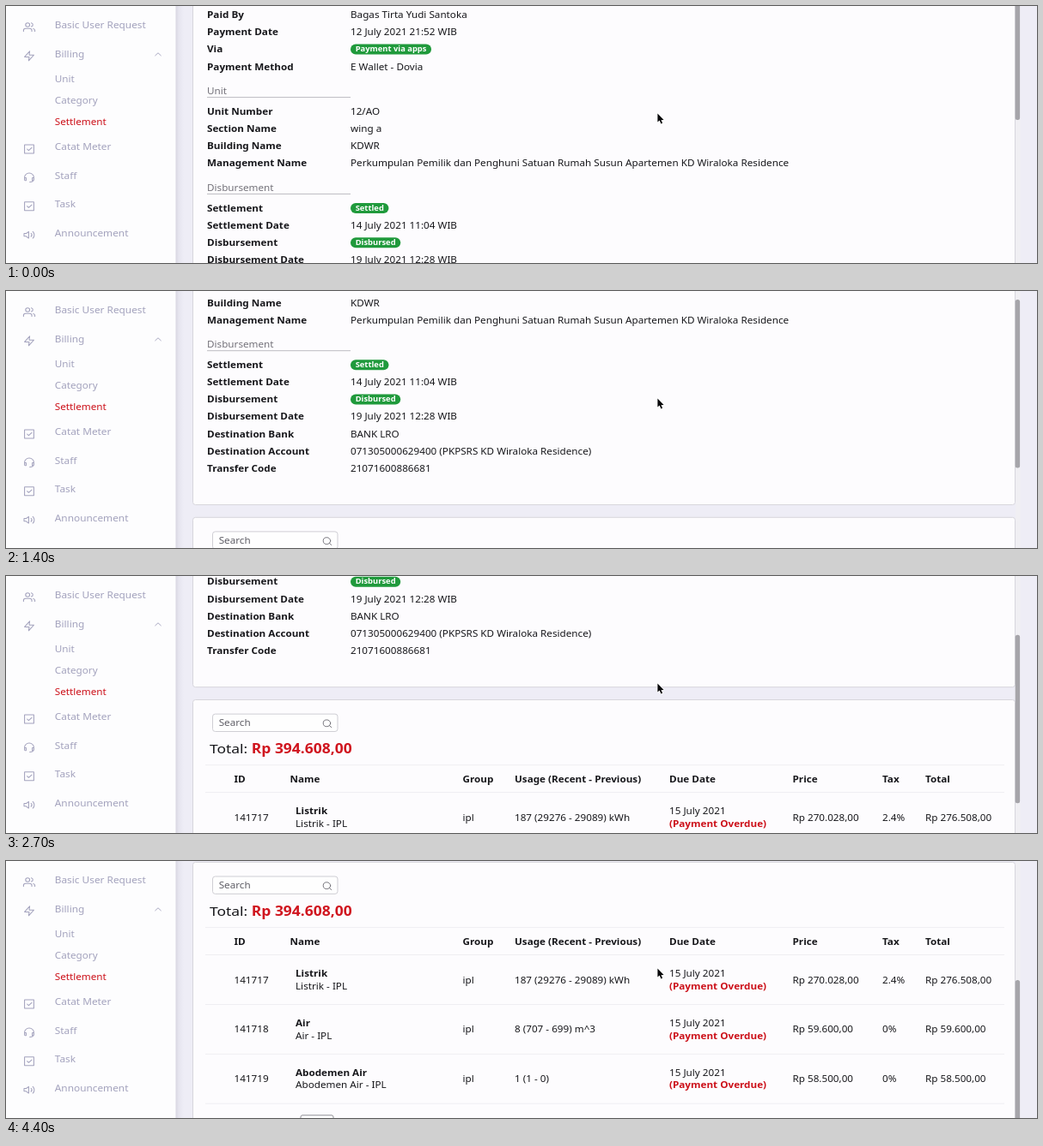
Recreate the animation shown at these times as an HTML page with a canvas. Size 1200 by 300 pixels, loop 4.5 s.

```html
<!DOCTYPE html>
<html lang="id">
<head>
<meta charset="utf-8">
<title>Settlement detail</title>
<style>
html, body { margin: 0; width: 100%; height: 100%; overflow: hidden; background: #eeedf6; }
canvas { display: block; width: 1200px; height: 300px; }
</style>
</head>
<body>
<canvas id="stage" width="1200" height="300"></canvas>
<script>
const ctx = document.getElementById('stage').getContext('2d');
const LOOP = 4500, STEP = 100;
const ASPECT = 0.87;            // the whole page is slightly flattened
const SIZE = 11.7;
const INK = '#17171b', MUTED = '#a3a2bd', GREY = '#737179', RED = '#cc1019', GREEN = '#209a3c';
const PAPER = '#fdfcfe', BACK = '#eeedf6', EDGE = '#d7d6dc';

// Scroll offset at given times
const scrollKeys = [[300, 0], [1000, 105.2], [1400, 149.7], [2300, 220], [3200, 333.6], [3900, 390.7], [4400, 412.6]];
const slopes = scrollKeys.map((key, i) => {
  const rate = j => (scrollKeys[j + 1][1] - scrollKeys[j][1]) / (scrollKeys[j + 1][0] - scrollKeys[j][0]);
  if (i === 0) return 0;
  if (i === scrollKeys.length - 1) return 0.02;
  const a = rate(i - 1), b = rate(i);
  return 2 * a * b / (a + b);
});

function scrollAt(t) {
  const last = scrollKeys.length - 1;
  if (t <= scrollKeys[0][0]) return 0;
  if (t >= scrollKeys[last][0]) return scrollKeys[last][1];
  const i = scrollKeys.findIndex(key => key[0] > t) - 1;
  const [t0, y0] = scrollKeys[i], [t1, y1] = scrollKeys[i + 1];
  const d = t1 - t0, u = (t - t0) / d, v = 1 - u;
  return y0 * v * v * (1 + 2 * u) + y1 * u * u * (3 - 2 * u)
    + d * u * v * (slopes[i] * v - slopes[i + 1] * u);
}

// Text is placed by the middle of its capitals
function text(str, x, y, { color = INK, bold = false, size = SIZE } = {}) {
  ctx.save();
  ctx.translate(x, y + size * 0.357 * ASPECT);
  ctx.scale(1, ASPECT);
  ctx.font = `${bold ? 700 : 400} ${size}px "Noto Sans", "Open Sans", sans-serif`;
  ctx.fillStyle = color;
  ctx.fillText(str, 0, 0);
  const width = ctx.measureText(str).width;
  ctx.restore();
  return width;
}

function box(x, y, w, h, r, fill, stroke) {
  ctx.beginPath();
  ctx.roundRect(x, y, w, h, r);
  if (fill) { ctx.fillStyle = fill; ctx.fill(); }
  if (stroke) { ctx.strokeStyle = stroke; ctx.lineWidth = 1; ctx.stroke(); }
}

function rule(x0, x1, y, color) {
  ctx.fillStyle = color;
  ctx.fillRect(x0, y - 0.5, x1 - x0, 1);
}

function pill(label, x, y) {
  const size = 9.4;
  ctx.font = `700 ${size}px "Noto Sans", "Open Sans", sans-serif`;
  const w = ctx.measureText(label).width + size * 1.2;
  box(x, y - 6, w, 12, 6, GREEN);
  text(label, x + size * 0.6, y - 0.2, { color: '#fff', bold: true, size });
}

const icons = {
  users: 'M17 21v-2a4 4 0 0 0-4-4H5a4 4 0 0 0-4 4v2 M13 7a4 4 0 1 1-8 0a4 4 0 1 1 8 0 M23 21v-2a4 4 0 0 0-3-3.9 M16 3.1a4 4 0 0 1 0 7.8',
  bolt: 'M13 2L3 14h9l-1 8 10-12h-9z',
  check: 'M3 3h18v18H3z M8 12l3 3 6-6',
  headset: 'M3 15v-3a9 9 0 0 1 18 0v3 M3 13h3v6H5a2 2 0 0 1-2-2z M21 13h-3v6h1a2 2 0 0 0 2-2z M20 18c0 3-3 4-7 4',
  speaker: 'M11 5L6 9H2v6h4l5 4z M15.5 8.5a5 5 0 0 1 0 7 M19 5a10 10 0 0 1 0 14',
  up: 'M6 15l6-6 6 6',
  search: 'M19 11a8 8 0 1 1-16 0a8 8 0 1 1 16 0 M21 21l-4.4-4.4'
};
for (const name in icons) icons[name] = new Path2D(icons[name]);

function icon(name, x, y, color, scale = 0.6) {
  ctx.save();
  ctx.translate(x, y);
  ctx.scale(scale, scale * 0.92);
  ctx.translate(-12, -12);
  ctx.strokeStyle = color;
  ctx.lineWidth = 1.75;
  ctx.lineCap = ctx.lineJoin = 'round';
  ctx.stroke(icons[name]);
  ctx.restore();
}

const menu = [
  ['Basic User Request', 22.7, 'users', 24.7],
  ['Billing', 56.2, 'bolt', 58.3],
  ['Catat Meter', 164.7, 'check', 167],
  ['Staff', 198.2, 'headset', 200],
  ['Task', 231.7, 'check', 233.7],
  ['Announcement', 265.2, 'speaker', 267.2]
];

function sidebar() {
  const shade = ctx.createLinearGradient(197, 0, 207, 0);
  shade.addColorStop(0, '#d6d5e0');
  shade.addColorStop(0.4, '#e6e5ef');
  shade.addColorStop(1, BACK);
  ctx.fillStyle = shade;
  ctx.fillRect(197, 0, 10, 300);
  ctx.fillStyle = '#fdfdfe';
  ctx.fillRect(0, 0, 197.5, 300);
  for (const [label, y, name, iconY] of menu) {
    text(label, 56.8, y, { color: MUTED, size: 11.83 });
    icon(name, 27, iconY, MUTED);
  }
  icon('up', 177, 56.3, MUTED, 0.55);
  text('Unit', 56.8, 85.3, { color: MUTED });
  text('Category', 56.8, 110.4, { color: MUTED });
  text('Settlement', 56.8, 135.4, { color: RED });
}

const details = [
  ['Paid By', 'Bagas Tirta Yudi Santoka', 10.5],
  ['Payment Date', '12 July 2021 21:52 WIB', 30.7],
  ['Via', 'Payment via apps', 50.7, true],
  ['Payment Method', 'E Wallet - Dovia', 71],
  ['Unit Number', '12/AO', 123.2],
  ['Section Name', 'wing a', 143.4],
  ['Building Name', 'KDWR', 163.6],
  ['Management Name', 'Perkumpulan Pemilik dan Penghuni Satuan Rumah Susun Apartemen KD Wiraloka Residence', 183.8],
  ['Settlement', 'Settled', 236, true],
  ['Settlement Date', '14 July 2021 11:04 WIB', 256.2],
  ['Disbursement', 'Disbursed', 276.3, true],
  ['Disbursement Date', '19 July 2021 12:28 WIB', 296.5],
  ['Destination Bank', 'BANK LRO', 316.7],
  ['Destination Account', '071305000629400 (PKPSRS KD Wiraloka Residence)', 337],
  ['Transfer Code', '21071600886681', 357.2]
];

function detailCard() {
  box(217.5, -300, 957, 699.2, 3, PAPER, EDGE);
  for (const [label, y] of [['Unit', 99.6], ['Disbursement', 212.4]]) {
    text(label, 234, y, { color: GREY });
    rule(234, 401, y + 7, '#bdbcc1');
  }
  for (const [label, value, y, badge] of details) {
    text(label, 234, y, { bold: true });
    if (badge) pill(value, 401, y - 0.1);
    else text(value, 401, y);
  }
}

const columns = [
  ['ID', 265.5], ['Name', 330.5], ['Group', 531.5], ['Usage (Recent - Previous)', 592],
  ['Due Date', 772], ['Price', 915.5], ['Tax', 1020], ['Total', 1070]
];
const bills = [
  ['141717', 'Listrik', '187 (29276 - 29089) kWh', 'Rp 270.028,00', '2.4%', 'Rp 276.508,00'],
  ['141718', 'Air', '8 (707 - 699) m^3', 'Rp 59.600,00', '0%', 'Rp 59.600,00'],
  ['141719', 'Abodemen Air', '1 (1 - 0)', 'Rp 58.500,00', '0%', 'Rp 58.500,00']
];

function billCard() {
  const line = '#efeef2';
  box(217.5, 414, 957, 500, 3, PAPER, EDGE);
  box(240.5, 430.6, 145.5, 20.4, 3, '#fefefe', '#cfced4');
  text('Search', 247.7, 441, { color: '#5f5e66' });
  icon('search', 374, 441.8, '#66656d', 0.53);
  const w = text('Total: ', 237, 471.3, { size: 17.46 });
  text('Rp 394.608,00', 237 + w, 471.3, { size: 17.46, bold: true, color: '#d0151f' });
  rule(232, 1162, 490.2, line);
  for (const [label, x] of columns) text(label, x, 506.6, { bold: true });
  rule(232, 1162, 522.1, line);
  bills.forEach(([id, name, usage, price, tax, total], i) => {
    const y = 551.5 + i * 57.8;
    text(id, 265.5, y);
    text(name, 337, y - 7.3, { bold: true });
    text(name + ' - IPL', 337, y + 7.2);
    text('ipl', 531.5, y);
    text(usage, 592, y);
    text('15 July 2021', 772, y - 7.3);
    text('(Payment Overdue)', 772, y + 7.2, { bold: true, color: RED });
    text(price, 915.5, y);
    text(tax, 1020, y);
    text(total, 1070, y);
    rule(232, 1162, y + 28.6, line);
  });
  box(343, 709.4, 38, 20, 2, '#fefefe', '#8d8c93');
}

function scrollbar(offset) {
  ctx.fillStyle = '#f0eff3';
  ctx.fillRect(1175, 0, 5.5, 300);
  box(1174.7, -63.5 + offset * 0.491, 5.4, 196.5, 2.5, '#a6a5aa');
}

const arrow = new Path2D('M0 0V10.2L2.3 8.2L4 12L5.7 11.3L4.1 7.6H7.2Z');
function pointer() {
  ctx.save();
  ctx.translate(758.4, 125.4);
  ctx.lineJoin = 'round';
  ctx.lineWidth = 1.4;
  ctx.strokeStyle = '#fff';
  ctx.stroke(arrow);
  ctx.fillStyle = '#08080a';
  ctx.fill(arrow);
  ctx.restore();
}

function draw(t) {
  const offset = scrollAt(Math.floor(t / STEP) * STEP);
  ctx.fillStyle = BACK;
  ctx.fillRect(0, 0, 1200, 300);
  ctx.save();
  ctx.translate(0, -offset);
  detailCard();
  billCard();
  ctx.restore();
  scrollbar(offset);
  sidebar();
  pointer();
}

const start = performance.now();
function tick() {
  draw((performance.now() - start) % LOOP);
  requestAnimationFrame(tick);
}
tick();
</script>
</body>
</html>
```
